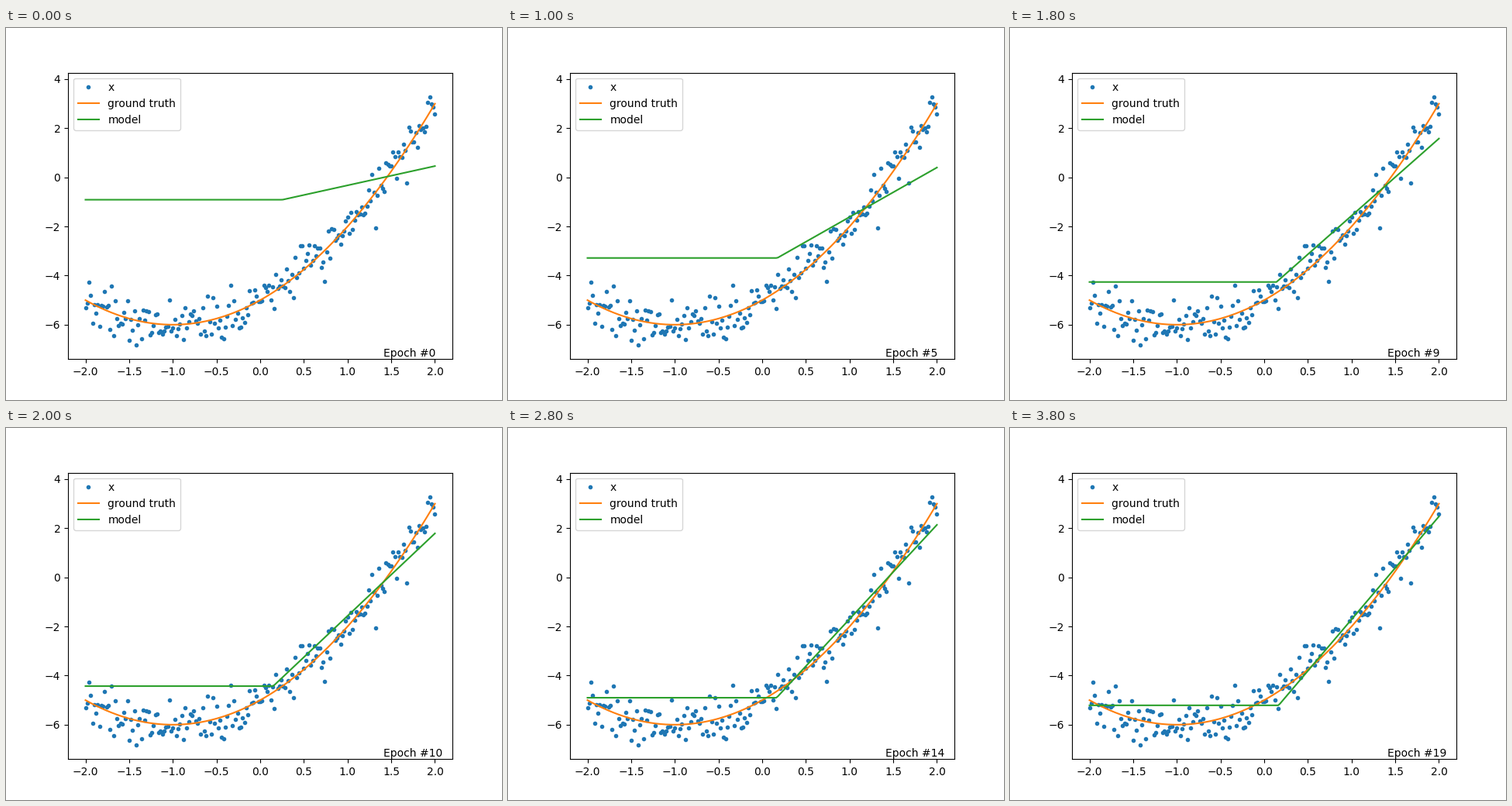
Write a matplotlib script that moves like this. It is 640x480 px and loops after 6 s.

```python
import numpy as np
import matplotlib.pyplot as plt
from matplotlib.animation import FuncAnimation

STEP_MS = 200
FRAMES = 30
LAST_EPOCH = 19
NOISE = 0.48

# Key epochs of the fit: where the line bends and its value at x = 2.
KINK_KEYS = [(0, 0.255), (3, 0.22), (7, 0.125), (12, 0.165), (19, 0.165)]
END_KEYS = [(0, 0.46), (1, -0.20), (3, -0.25), (4, 0.02),
            (7, 1.16), (10, 1.79), (14, 2.14), (19, 2.48)]


def between(keys, epoch):
    return np.interp(epoch, *zip(*keys))


def truth(x):
    return x**2 + 2 * x - 5


def model(x, epoch):
    flat = -5.5 + 4.59 * np.exp(-0.1455 * epoch)
    kink = between(KINK_KEYS, epoch)
    slope = (between(END_KEYS, epoch) - flat) / (2 - kink)
    return flat + slope * np.maximum(0, x - kink)


x = np.linspace(-2, 2, 201)
noise = np.random.default_rng(4).normal(0, NOISE, x.size)

fig, ax = plt.subplots(figsize=(6.4, 4.8), dpi=100)
ax.plot(x, truth(x) + noise, ".", label="x")
ax.plot(x, truth(x), label="ground truth")
line, = ax.plot(x, model(x, 0), label="model")
ax.set_xlim(-2.2, 2.2)
ax.set_ylim(-7.4, 4.265)
ax.legend(loc="upper left")
label = ax.text(0.82, 0.01, "Epoch #0", transform=ax.transAxes)


def update(frame):
    epoch = min(frame, LAST_EPOCH)
    line.set_ydata(model(x, epoch))
    label.set_text(f"Epoch #{epoch}")
    return line, label


anim = FuncAnimation(fig, update, frames=FRAMES, interval=STEP_MS,
                     repeat=True, repeat_delay=0)
plt.show()
```
